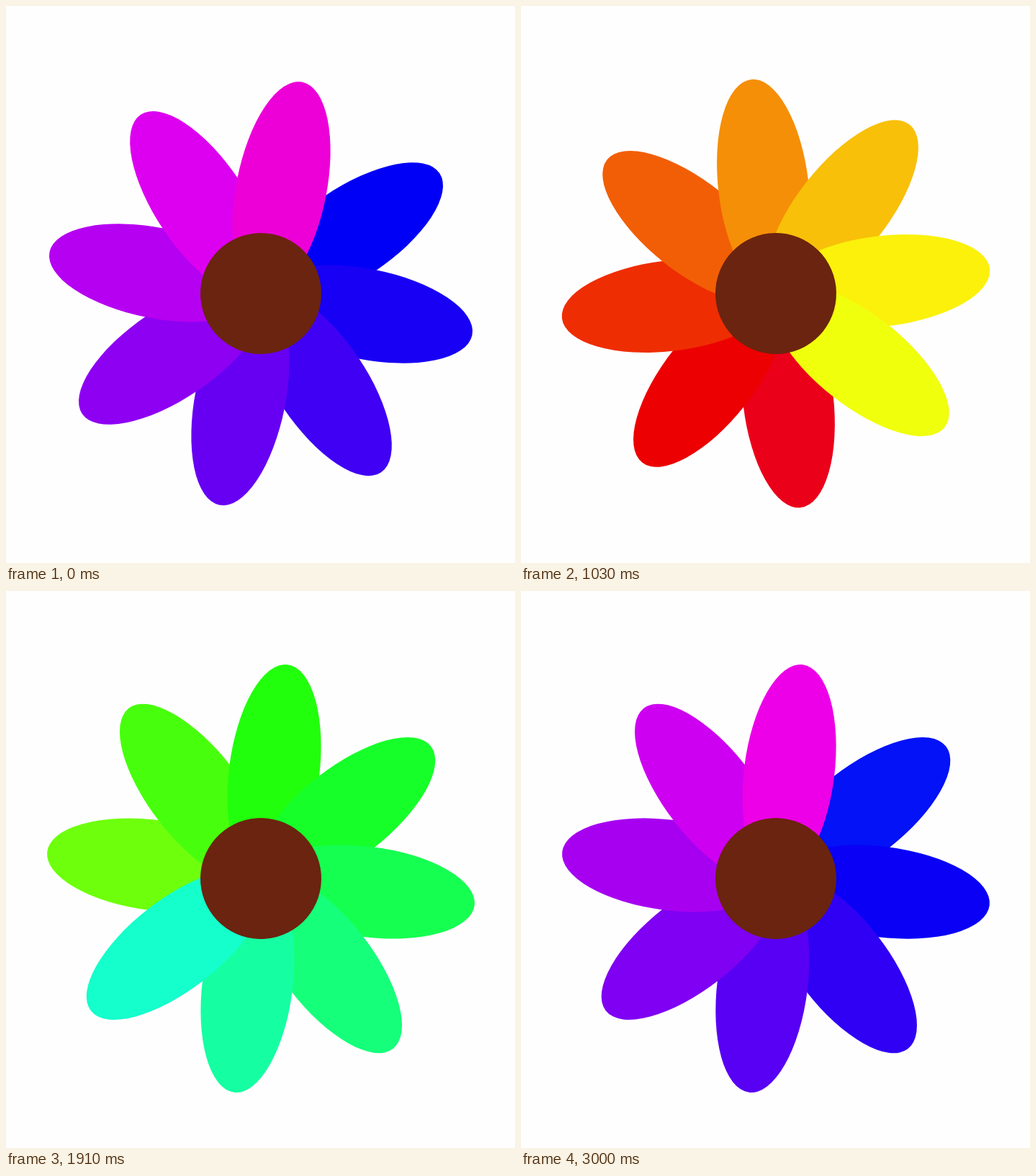
Write an HTML page with a canvas that moves like this. It is 707 px wide and 773 px high and loops after 3030 ms.

```html
<!DOCTYPE html>
<html lang="en">
<head>
<meta charset="utf-8">
<title>Spinning flower</title>
<style>
  html, body { margin: 0; height: 100%; overflow: hidden; background: #fffeff; }
  canvas { display: block; }
</style>
</head>
<body>
<canvas id="stage" width="707" height="773"></canvas>
<script>
const ctx = document.getElementById('stage').getContext('2d');
const LOOP = 3030, TICKS = 91, TURN = 2 * Math.PI;

// Colours every 60 degrees of hue, from red round to magenta
const WHEEL = [
  [235, 0, 0], [253, 255, 12], [22, 255, 12],
  [20, 255, 255], [0, 0, 245], [237, 0, 240]
];

// One turn per loop, in ticks, with a slight sway in speed; in degrees
function rotationAt(t) {
  const p = Math.floor(t / LOOP * TICKS + 0.4) / TICKS;
  return 233.1 + 360 * p + 3.1 * Math.cos(TURN * p + 0.29);
}

function petalColor(hue) {
  const h = hue % 360 / 60, i = Math.floor(h);
  const next = WHEEL[(i + 1) % 6];
  const [r, g, b] = WHEEL[i].map((c, n) => c + (next[n] - c) * (h - i));
  const green = Math.max(0, Math.min(255, 1.15 * g - 20));
  return `rgb(${[r, green, b].map(Math.round)})`;
}

function fillEllipse(y, rx, ry, color) {
  ctx.fillStyle = color;
  ctx.beginPath();
  ctx.ellipse(0, y, rx, ry, 0, 0, TURN);
  ctx.fill();
}

function draw() {
  const rotation = rotationAt(performance.now() % LOOP);
  ctx.setTransform(1, 0, 0, 1, 0, 0);
  ctx.clearRect(0, 0, 707, 773);
  ctx.translate(354, 399);
  ctx.rotate(rotation / 360 * TURN);
  // A red petal hangs straight down; each next one is 10 degrees of hue on
  for (let k = 0; k < 8; k++) {
    fillEllipse(149.1, 62.8, 150, petalColor(rotation + 10 * k));
    ctx.rotate(TURN / 8);
  }
  fillEllipse(0, 84, 84, '#6b240f');
  requestAnimationFrame(draw);
}
draw();
</script>
</body>
</html>
```
